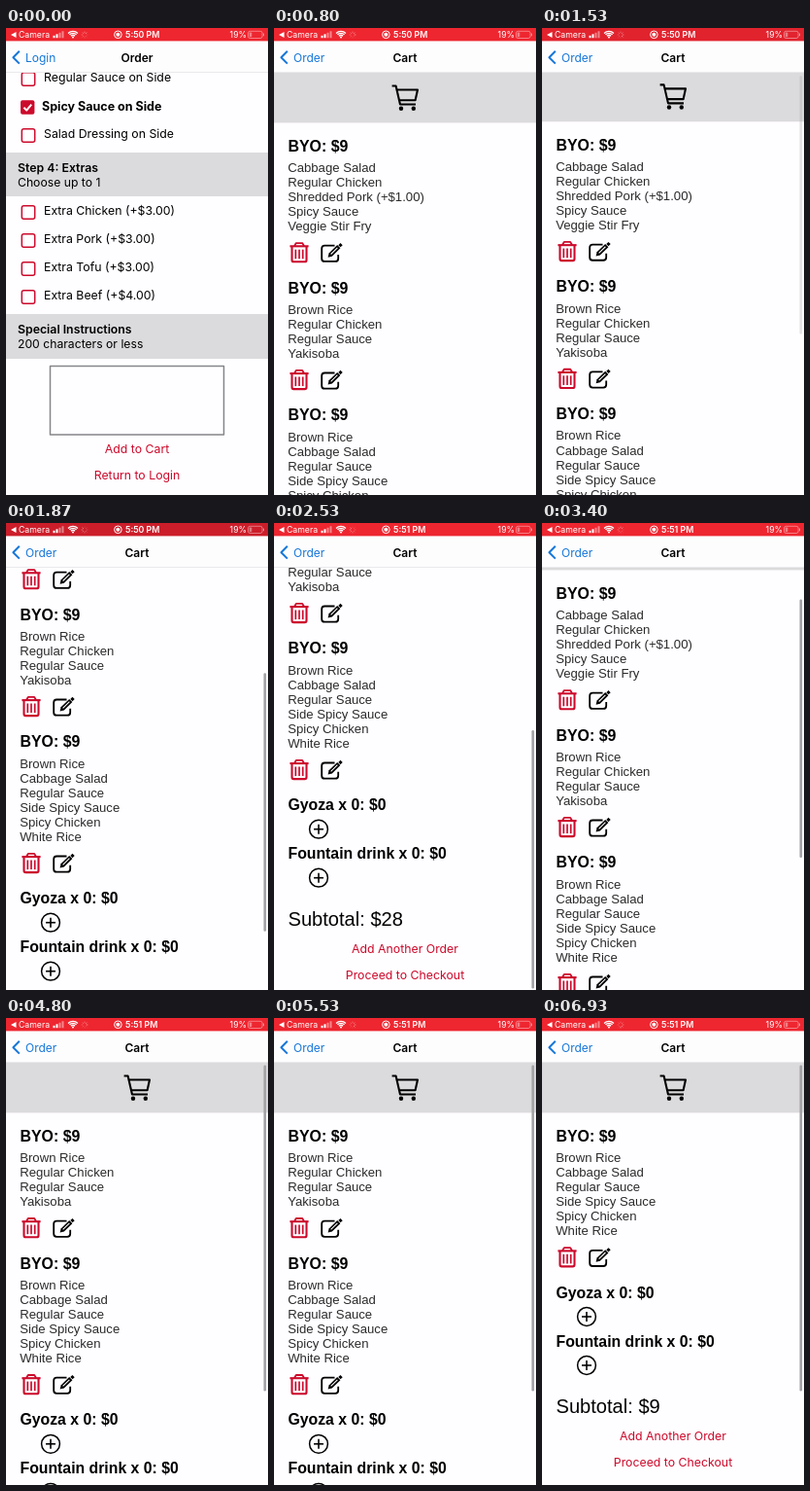
Animation, 270 px wide and 480 px high, one loop 6990 ms. Source, as an HTML page with a canvas:

```html
<!DOCTYPE html>
<html lang="en">
<head>
<meta charset="utf-8">
<title>Cart</title>
<style>
html, body { margin: 0; width: 100%; height: 100%; overflow: hidden; background: #fff; }
canvas { display: block; width: 270px; height: 480px; }
</style>
</head>
<body>
<canvas id="stage"></canvas>
<script>
const W = 270, H = 480, LOOP = 6990;
const NAV = 46, TRACK = 430, VIEW = 434;
const RED = '#cc0a2b', BLUE = '#1677d8', BANNER = '#dbdadc', PAGE = '#fefdff';
const UI = 'Inter, "Open Sans", sans-serif';
const HELV = '"Liberation Sans", Arial, sans-serif';

const canvas = document.getElementById('stage');
const ctx = canvas.getContext('2d');
const dpr = window.devicePixelRatio || 1;
canvas.width = W * dpr;
canvas.height = H * dpr;

const meals = [
  { price: 10, lines: ['Cabbage Salad', 'Regular Chicken', 'Shredded Pork (+$1.00)', 'Spicy Sauce', 'Veggie Stir Fry'] },
  { price: 9, lines: ['Brown Rice', 'Regular Chicken', 'Regular Sauce', 'Yakisoba'] },
  { price: 9, lines: ['Brown Rice', 'Cabbage Salad', 'Regular Sauce', 'Side Spicy Sauce', 'Spicy Chicken', 'White Rice'] }
];
const DELETE_1 = 4600, DELETE_2 = 6270;

const clamp = v => Math.max(0, Math.min(1, v));
const part = (t, a, b) => clamp((t - a) / (b - a));
const easeIn = p => p * p;
const easeOut = p => 1 - Math.pow(1 - p, 3);

// y is the middle of the capital letters
function text(s, x, y, size, opt = {}) {
  const { font = UI, weight = 400, color = '#000', align = 'left' } = opt;
  ctx.font = `${weight} ${size}px ${font}`;
  ctx.fillStyle = color;
  ctx.textAlign = align;
  ctx.textBaseline = 'alphabetic';
  ctx.fillText(s, x, y + size * 0.36);
}

function rect(x, y, w, h, color) {
  ctx.fillStyle = color;
  ctx.fillRect(x, y, w, h);
}

function paint(color, width) {
  if (width) {
    ctx.lineWidth = width;
    ctx.strokeStyle = color;
    ctx.stroke();
  } else {
    ctx.fillStyle = color;
    ctx.fill();
  }
}

function shape(points, color, width) {
  ctx.beginPath();
  points.forEach(([x, y]) => ctx.lineTo(x, y));
  paint(color, width);
}

function circle(x, y, r, color, width) {
  ctx.beginPath();
  ctx.arc(x, y, r, 0, Math.PI * 2);
  paint(color, width);
}

function box(x, y, w, h, r, color, width) {
  ctx.beginPath();
  ctx.roundRect(x, y, w, h, r);
  paint(color, width);
}

function at(x, y, draw) {
  ctx.save();
  ctx.translate(x, y);
  draw();
  ctx.restore();
}

function trash(y) {
  at(26, y, () => {
    shape([[-9.6, -6.6], [9.6, -6.6]], RED, 2.1);
    shape([[-5, -7], [-3.2, -9.8], [3.2, -9.8], [5, -7]], RED, 1.8);
    ctx.beginPath();
    ctx.moveTo(-7.5, -6);
    ctx.arcTo(-7.5, 9.4, 0, 9.4, 1.8);
    ctx.arcTo(7.5, 9.4, 7.5, -6, 1.8);
    ctx.lineTo(7.5, -6);
    paint(RED, 2.1);
    for (const x of [-3.7, 0, 3.7]) shape([[x, -3.2], [x, 6.4]], RED, 1.7);
  });
}

function pencil(y) {
  at(60, y, () => {
    ctx.beginPath();
    ctx.moveTo(2.5, -7.2);
    ctx.arcTo(-10.8, -7.2, -10.8, 0, 3);
    ctx.arcTo(-10.8, 9, 0, 9, 3);
    ctx.arcTo(6.2, 9, 6.2, 0, 3);
    ctx.lineTo(6.2, 2);
    paint('#000', 1.8);
    shape([[-4.4, 4.8], [-3.4, 0.6], [5.2, -7.8], [8.4, -4.6], [-0.2, 3.8]], '#000');
    shape([[-1.4, 1.6], [5.4, -5]], PAGE, 1.1);
    shape([[7.4, -8.8], [9.6, -6.6]], '#000', 3);
  });
}

function cartIcon(y) {
  at(135, y, () => {
    shape([[-13.4, -12], [-9.4, -12], [-5, 7], [11, 7]], '#000', 2.1);
    shape([[-8.4, -8], [13, -8], [10.6, 2.8], [-6, 2.8]], '#000', 2.1);
    circle(-4, 11.2, 2.2, '#000');
    circle(8.8, 11.2, 2.2, '#000');
  });
}

function plus(y) {
  circle(46, y, 9.4, '#000', 1.5);
  shape([[41, y], [51, y]], '#000', 1.6);
  shape([[46, y - 5], [46, y + 5]], '#000', 1.6);
}

function option(label, y, checked) {
  const by = y + 1.5;
  if (checked) {
    box(15, by - 7.2, 14.4, 14.4, 2, RED);
    shape([[18.4, by + 0.3], [21.2, by + 3.1], [26.2, by - 2.9]], '#fff', 2);
    text(label, 37, y, 12.5, { weight: 700 });
  } else {
    box(16.3, by - 6.7, 13.4, 13.4, 2, RED, 1.5);
    text(label, 39, y, 12.3);
  }
}

function section(title, hint, y, h) {
  rect(0, y, W, h, BANNER);
  text(title, 12, y + 16, 12.3, { weight: 600 });
  text(hint, 12, y + 31, 12.2);
}

function link(label, y) {
  text(label, 135, y, 12.3, { color: RED, align: 'center' });
}

function orderPage() {
  rect(0, NAV, W, H - NAV, PAGE);
  option('Regular Sauce on Side', 51);
  option('Spicy Sauce on Side', 80, true);
  option('Salad Dressing on Side', 109);
  section('Step 4: Extras', 'Choose up to 1', 128, 45);
  ['Chicken (+$3.00)', 'Pork (+$3.00)', 'Tofu (+$3.00)', 'Beef (+$4.00)']
    .forEach((s, i) => option('Extra ' + s, 188 + i * 29));
  section('Special Instructions', '200 characters or less', 294, 46);
  box(45.5, 347.5, 179, 70.5, 0, '#85868a', 1.5);
  link('Add to Cart', 433);
  link('Return to Login', 460);
}

function scrollAt(t) {
  if (t < 2900) {
    return 173 * easeIn(part(t, 1500, 1870)) + 96 * easeOut(part(t, 1870, 2270));
  }
  return 269 - 220 * easeIn(part(t, 2930, 3400)) - 49 * easeOut(part(t, 3400, 3720));
}

function cartPage(t) {
  const first = t < DELETE_1 ? 0 : t < DELETE_2 ? 1 : 2;
  const list = meals.slice(first);
  const total = list.reduce((sum, meal) => sum + meal.price, 0);
  const scroll = scrollAt(t);
  const bold = { font: HELV, weight: 700 };
  const thin = { font: HELV, color: '#2b2b2b' };

  rect(0, NAV, W, H - NAV, PAGE);
  ctx.save();
  ctx.translate(0, -scroll);
  rect(0, NAV, W, 51.4, BANNER);
  cartIcon(71.5);
  let y = 121;
  for (const { lines } of list) {
    text('BYO: $9', 14.5, y, 15.9, bold);
    lines.forEach((s, i) => text(s, 14.2, y + 22.2 + i * 15.1, 13.15, thin));
    y += 34.4 + lines.length * 15.1;
    trash(y);
    pencil(y);
    y += 36;
  }
  text('Gyoza x 0: $0', 14.5, y, 15.8, bold);
  plus(y + 25);
  text('Fountain drink x 0: $0', 14.5, y + 50, 15.8, bold);
  plus(y + 75);
  text('Subtotal: $' + total, 14.5, y + 117, 20.1, { font: HELV });
  link('Add Another Order', y + 148);
  link('Proceed to Checkout', y + 175);
  ctx.restore();

  const shown = part(t, 1500, 1600);
  if (shown) {
    const content = first ? 557 : 703;
    ctx.globalAlpha = shown;
    box(265.5, 48.5 + scroll * TRACK / content, 2.6, TRACK * VIEW / content, 1.3, '#a2a1a6');
    ctx.globalAlpha = 1;
  }
}

function navBar(p) {
  rect(0, 13, W, NAV - 13, '#fdfdfe');
  rect(0, NAV - 0.5, W, 0.5, '#d6d6da');
  shape([[13.8, 23.8], [7.4, 30.2], [13.8, 36.6]], BLUE, 2);
  const back = { color: BLUE };
  const title = { weight: 600, align: 'center' };
  const label = (s, x, alpha, style) => {
    if (alpha <= 0) return;
    ctx.globalAlpha = alpha;
    text(s, x, 30.2, 12, style);
    ctx.globalAlpha = 1;
  };
  label('Login', 20 - 40 * p, 1 - p * 2, back);
  label('Order', 135 - 99 * p, 1 - p, title);
  label('Order', 20 + 99 * (1 - p), p, back);
  label('Cart', 135 + 110 * (1 - p), p, title);
}

function statusBar(t) {
  // the recording bar dims briefly
  const dim = Math.pow(Math.cos(Math.PI / 2 * Math.min(1, Math.abs(t - 1870) / 600)), 2);
  rect(0, 0, W, 13.4, `rgb(${238 - 34 * dim}, ${38 - 8 * dim}, ${48 - 6 * dim})`);
  const white = { color: '#fff' };
  shape([[5, 7], [10.5, 4], [10.5, 10]], '#fff');
  text('Camera', 13, 6.9, 8.7, white);
  for (let i = 0; i < 4; i++) {
    const h = 2.4 + i * 1.5;
    rect(48.5 + i * 3, 10.2 - h, 2, h, i < 2 ? '#fff' : 'rgba(255,255,255,.45)');
  }
  for (const r of [2.9, 5, 7]) {
    ctx.beginPath();
    ctx.arc(69, 10.4, r, -Math.PI * 0.75, -Math.PI * 0.25);
    paint('#fff', 1.4);
  }
  circle(69, 9.4, 1, '#fff');
  at(81, 7, () => {
    const lead = Math.floor(t / 83);
    for (let i = 0; i < 8; i++) {
      const x = Math.cos(i * Math.PI / 4), y = Math.sin(i * Math.PI / 4);
      const alpha = 0.15 + 0.45 * (((i - lead) % 8 + 8) % 8) / 8;
      shape([[x * 1.6, y * 1.6], [x * 3.4, y * 3.4]], `rgba(255,255,255,${alpha})`, 0.8);
    }
  });
  circle(115.4, 6.8, 3.8, '#fff', 1);
  circle(115.4, 6.8, 2, '#fff');
  text(t < 2200 ? '5:50 PM' : '5:51 PM', 123, 6.9, 8.8, { color: '#fff', weight: 600 });
  text('19%', 230.6, 6.9, 8.7, white);
  box(249.5, 3.3, 14.6, 7.2, 2, 'rgba(255,255,255,.5)', 0.8);
  box(250.7, 4.5, 2.6, 4.8, 0.8, 'rgba(255,255,255,.4)');
  rect(265, 5.6, 1, 2.6, 'rgba(255,255,255,.5)');
}

function draw(t) {
  ctx.setTransform(dpr, 0, 0, dpr, 0, 0);
  ctx.lineJoin = 'round';
  rect(0, 0, W, H, '#fff');
  const p = easeOut(part(t, 130, 660));
  ctx.save();
  ctx.beginPath();
  ctx.rect(0, NAV, W, H - NAV);
  ctx.clip();
  if (p < 1) {
    at(-81 * p, 0, orderPage);
    rect(0, NAV, W, H - NAV, `rgba(0,0,0,${0.1 * p})`);
  }
  if (p > 0) at(W * (1 - p), 0, () => cartPage(t));
  ctx.restore();
  navBar(p);
  statusBar(t);
}

let start;
function tick(now) {
  if (start === undefined) start = now;
  draw((now - start) % LOOP);
  requestAnimationFrame(tick);
}
draw(0);
requestAnimationFrame(tick);
</script>
</body>
</html>
```
